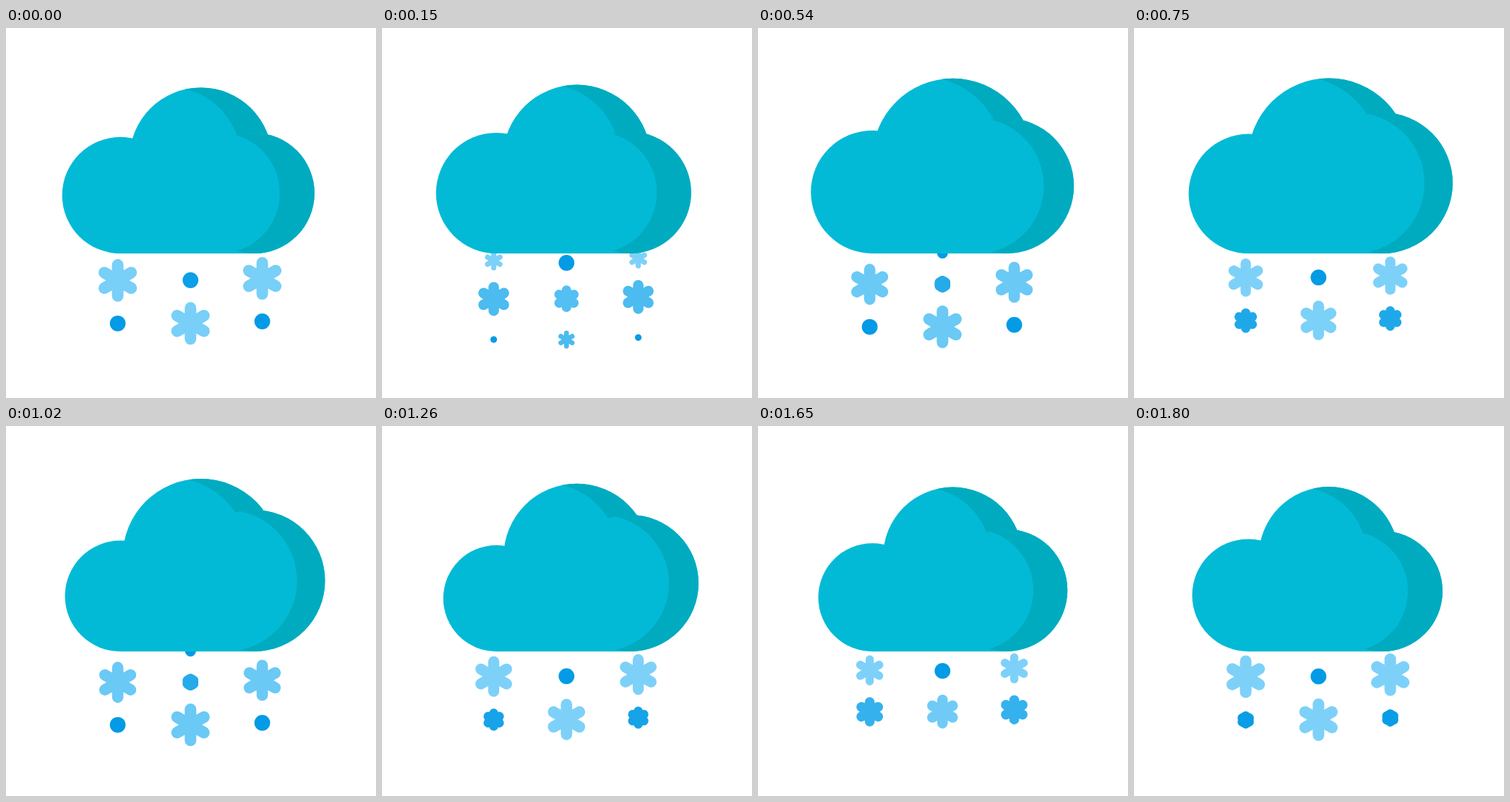
Animation, 512 px wide and 512 px high, one loop 1.83 s. Source, as an HTML page with a canvas:

```html
<!DOCTYPE html>
<html lang="en">
<head>
<meta charset="utf-8">
<title>Snow cloud</title>
<style>
html, body { margin: 0; width: 100%; height: 100%; overflow: hidden; background: #fff; }
canvas { display: block; width: 100vmin; height: 100vmin; }
</style>
</head>
<body>
<canvas id="stage" width="512" height="512"></canvas>
<script>
const ctx = document.getElementById('stage').getContext('2d');
const LOOP = 1830, STEP = 30, FALL = 480, HALF_SWELL = 960;
const SIZE = 512, BASE = 312, TAU = Math.PI * 2;
const LIGHT = '#02bad6', SHADE = '#00abc0';
const DOT = [3, 155, 229], FLAKE = [125, 209, 248];

const lerp = (a, b, k) => a + (b - a) * k;
const clamp = x => Math.max(0, Math.min(1, x));
const smooth = x => { x = clamp(x); return x * x * (3 - 2 * x); };
const smoother = x => { x = clamp(x); return x * x * x * (10 - 15 * x + 6 * x * x); };
const mix = k => `rgb(${DOT.map((c, i) => Math.round(lerp(c, FLAKE[i], k))).join(',')})`;

// Cubic Bezier easing, solved by halving
function bezier(x1, y1, x2, y2) {
  const at = (a, b, t) => 3 * (1 - t) * (1 - t) * t * a + 3 * (1 - t) * t * t * b + t * t * t;
  return x => {
    x = clamp(x);
    let lo = 0, hi = 1;
    for (let i = 0; i < 20; i++) {
      const m = (lo + hi) / 2;
      if (at(x1, x2, m) < x) lo = m; else hi = m;
    }
    return at(y1, y2, hi);
  };
}
const drop = bezier(0.7, 0.1, 0.5, 1);

// Eased swing between two radii, largest at time peak
function swell(t, min, max, peak) {
  const d = Math.abs(t - peak) / HALF_SWELL;
  return lerp(max, min, smoother(d > 1 ? 2 - d : d));
}

function disc(x, y, r) {
  const p = new Path2D();
  p.arc(x, y, r, 0, TAU);
  return p;
}

// Light disc with a dark crescent on its right side
function puff(x, y, r, litX, litR) {
  const body = disc(x, y, r);
  const outside = new Path2D();
  outside.rect(0, 0, SIZE, SIZE);
  outside.addPath(disc(litX, y, litR));
  ctx.fillStyle = LIGHT;
  ctx.fill(body);
  ctx.save();
  ctx.clip(body);
  ctx.fillStyle = SHADE;
  ctx.fill(outside, 'evenodd');
  ctx.restore();
}

function cloud(t) {
  const left = swell(t, 73.3, 85.3, 425);
  const top = swell(t, 96.4, 111.6, 685);
  const right = swell(t, 83.4, 98.1, 918);
  const lx = 158.3, rx = 343.5;
  puff(269.5, 181, top, 226, top + (top - 98) * 0.2);
  ctx.fillStyle = LIGHT;
  ctx.fill(disc(lx, BASE - left, left));
  ctx.fillRect(lx, BASE - 85, rx - lx, 85);
  puff(rx, BASE - right, right, rx - 48 + (right - 83.5) * 0.64, right);
}

// open: 0 is a dot, 1 is a full snowflake
function grain(x, y, open, tint, size) {
  if (size <= 0) return;
  ctx.save();
  ctx.translate(x, y);
  ctx.scale(size, size);
  ctx.fillStyle = ctx.strokeStyle = mix(tint);
  ctx.lineCap = 'round';
  ctx.lineWidth = 2 * lerp(5.5, 8, open);
  ctx.fill(disc(0, 0, 10.9));
  const len = lerp(3.5, 21.5, open);
  ctx.beginPath();
  for (let i = 0; i < 3; i++) {
    const ang = Math.PI / 2 + i * Math.PI / 3;
    const dx = Math.cos(ang) * len, dy = Math.sin(ang) * len;
    ctx.moveTo(-dx, -dy);
    ctx.lineTo(dx, dy);
  }
  ctx.stroke();
  ctx.restore();
}

function snow(t) {
  const u = (t + 60) % FALL, x = u / FALL;
  const p = drop(u / 385);
  const mid = 346.9 + 59.8 * p, low = 406.7 + 52 * p;
  const grow = smoother(u / 440);
  const out = clamp(1 - 1.75 * (p - 0.138));
  const fade = 1 - smooth(x);

  // side columns: flake turning into a dot
  for (const [cx, dy] of [[154.6, 0], [354.6, -2.8]]) {
    grain(cx, lerp(300, 346.9, p) + dy, 1, 1, grow);
    grain(cx, mid + dy, clamp(1 - (u - 100) / 375), fade, 1);
    grain(cx, low + dy, 0, 0, out);
  }

  // middle column: dot turning into a flake
  grain(255.3, lerp(306, 346.5, p), 0, 0, clamp(x * 2.8));
  grain(255.3, mid - 0.3, grow, smooth(x * 1.4), 1);
  grain(255.3, low, 1, fade, out);
}

function draw(now) {
  const t = Math.floor((now % LOOP) / STEP) * STEP;
  ctx.fillStyle = '#fff';
  ctx.fillRect(0, 0, SIZE, SIZE);
  snow(t);
  cloud(t);
}

let start = null;
function tick(now) {
  if (start === null) start = now;
  draw(now - start);
  requestAnimationFrame(tick);
}
draw(0);
requestAnimationFrame(tick);
</script>
</body>
</html>
```
